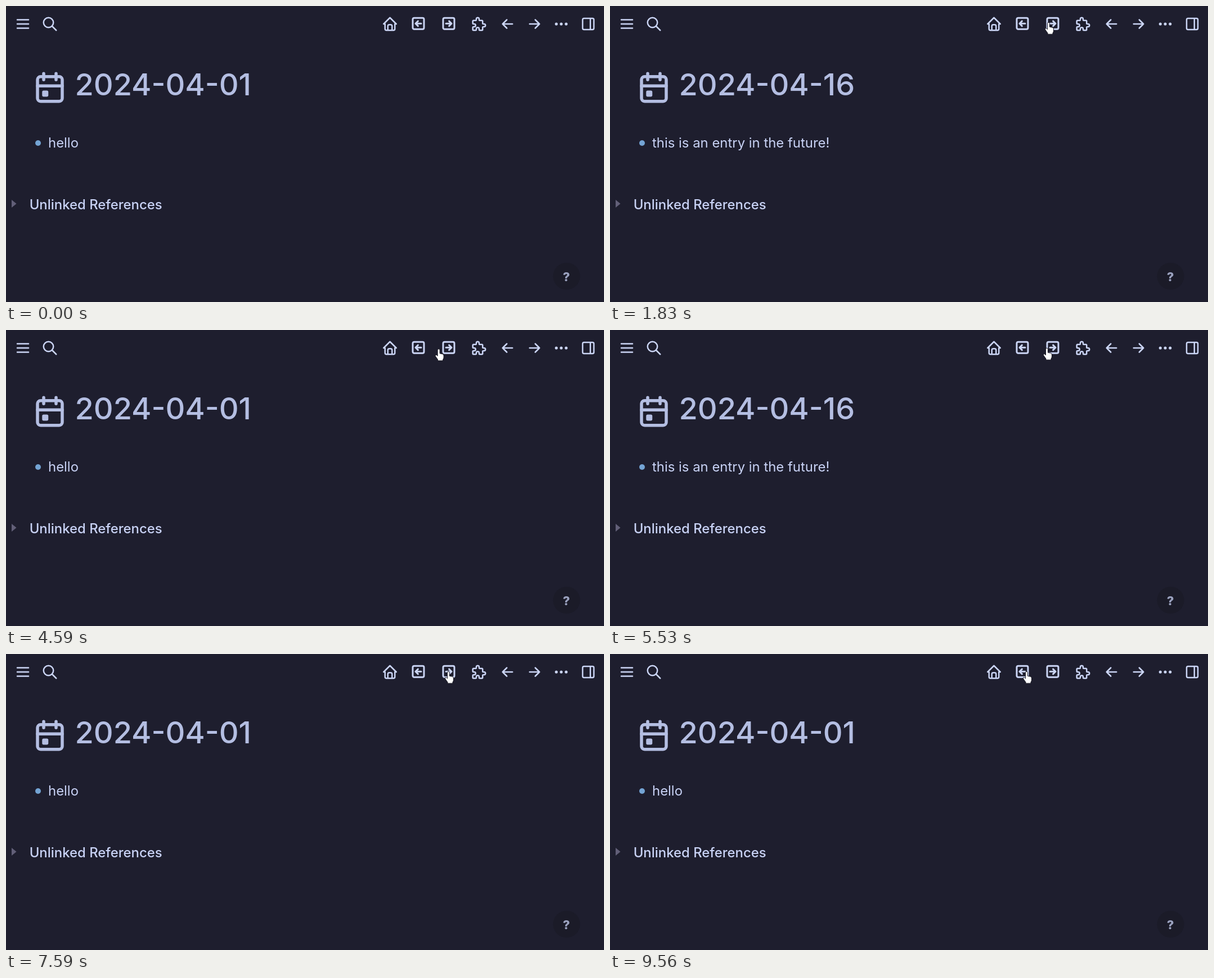
Write an HTML page that moves like this. It is 1063 px wide and 527 px high and loops after 9.96 s.

```html
<!DOCTYPE html>
<html lang="en">
<head>
<meta charset="utf-8">
<title>Journal day navigation</title>
<style>
  html, body { margin: 0; width: 100%; height: 100%; overflow: hidden; background: #1e1e2e; }
  svg { display: block; width: 100%; height: 100%; font-family: Inter, sans-serif; }
  text { fill: #c9d3f6; font-size: 23.9px; }
  .icon { fill: none; stroke: #cbd5f5; stroke-width: 2; stroke-linecap: round; stroke-linejoin: round; }
  #title { fill: #b4bee2; font-size: 54px; font-weight: 500; }
  #tooltip text { fill: #d8d9dc; font: 14.6px "Open Sans", sans-serif; }
  #cursor path { fill: #fff; stroke: #14141f; stroke-width: 1; }
</style>
</head>
<body>
<svg viewBox="0 0 1063 527">
  <g id="toolbar"></g>

  <g class="icon" transform="translate(45 112) scale(2.75)" style="stroke:#b4bee2">
    <rect x="4" y="5" width="16" height="16" rx="2"/>
    <path d="M16 3v4M8 3v4M4 11h16M8 15h2v2h-2z"/>
  </g>
  <text id="title" x="122.500" y="159"></text>

  <circle cx="57" cy="244" r="5" fill="#74a4d4"/>
  <text id="entry" x="75" y="252"></text>

  <path d="M10 345L18.500 352L10 359z" fill="#625f78"/>
  <text x="41.700" y="362" font-weight="500">Unlinked References</text>

  <circle cx="996.500" cy="481" r="24" fill="#1b1b28"/>
  <text x="996" y="490" text-anchor="middle" style="font-size:22px;font-weight:800;fill:#9ba2bf">?</text>

  <g id="tooltip">
    <rect x="790.500" y="49.500" width="137" height="34" fill="#262929" stroke="#96999b"/>
    <text x="802" y="71">open-d-next-day</text>
  </g>

  <g id="cursor">
    <path id="hand" transform="translate(-.5 -.8)" d="M-2 2Q-2 0 0 0Q2 0 2 2V8L7 9Q9 9.500 9 12V15Q9 17 7.500 19V21H-1.500V19Q-4 15.500 -6 12.500Q-6.500 10 -4 10.500L-2 12.500z"/>
    <path id="arrow" d="M0 0V18L4 14.500L7 21L10 19.700L7.200 13.500H12.500z"/>
    <circle id="press" cx="-1.500" cy="-1.500" r="14.500" fill="#ff0" fill-opacity=".47"/>
  </g>
</svg>

<script>
const $ = id => document.getElementById(id);
const LOOP = 9960;

const box = 'M6 4h12a2 2 0 0 1 2 2v12a2 2 0 0 1-2 2h-12a2 2 0 0 1-2-2v-12a2 2 0 0 1 2-2z';
const icons = [
  [30, 32, 'M4 6h16M4 12h16M4 18h16'],
  [78, 32, 'M3 10a7 7 0 1 0 14 0a7 7 0 1 0-14 0M21 21l-6-6'],
  [682.5, 32, 'M5 12h-2l9-9l9 9h-2M5 12v7a2 2 0 0 0 2 2h10a2 2 0 0 0 2-2v-7M9 21v-6a2 2 0 0 1 2-2h2a2 2 0 0 1 2 2v6'],
  [733, 31.2, box + 'M8 12h8M8 12l3.500 3.500M8 12l3.500-3.500', 2.4],
  [787, 31.2, box + 'M8 12h8M16 12l-3.500 3.500M16 12l-3.500-3.500', 2.4],
  [841, 32, 'M4 7h3a1 1 0 0 0 1-1v-1a2 2 0 0 1 4 0v1a1 1 0 0 0 1 1h3a1 1 0 0 1 1 1v3a1 1 0 0 0 1 1h1a2 2 0 0 1 0 4h-1a1 1 0 0 0-1 1v3a1 1 0 0 1-1 1h-3a1 1 0 0 1-1-1v-1a2 2 0 0 0-4 0v1a1 1 0 0 1-1 1h-3a1 1 0 0 1-1-1v-3a1 1 0 0 1 1-1h1a2 2 0 0 0 0-4h-1a1 1 0 0 1-1-1v-3a1 1 0 0 1 1-1z'],
  [891.5, 32, 'M5 12h14M5 12l6 6M5 12l6-6'],
  [939.5, 32, 'M5 12h14M19 12l-6 6M19 12l-6-6'],
  [987, 32, 'M5 12h.01M12 12h.01M19 12h.01', 4.1],
  [1035, 32, box + 'M15 4v16']
];
$('toolbar').innerHTML = icons.map(([x, y, d, width = 2]) =>
  `<path class="icon" transform="translate(${x - 15} ${y - 15}) scale(1.25)" d="${d}" style="stroke-width:${width}"/>`
).join('');

// Pointer hotspot: time, x, y
const path = [
  [70, 985, 510], [320, 890, 270], [560, 774, 25], [690, 780, 30],
  [2590, 780, 30], [3050, 737, 36],
  [4340, 737, 36], [4730, 783, 34],
  [5460, 783, 33], [5530, 777, 33], [6300, 735, 31],
  [7060, 735, 31], [7340, 762, 28], [7590, 787, 32],
  [8330, 787, 32], [8470, 777, 31], [8820, 739, 31], [8960, 741, 32]
];
const presses = [1490, 3380, 4800, 6430, 7860, 9150];
const pageTurns = [1760, 3650, 5060, 6630, 8130, 9360];
const pages = [
  ['2024-04-01', 'hello'],
  ['2024-04-16', 'this is an entry in the future!']
];

function pointerAt(t) {
  const next = path.findIndex(key => key[0] > t);
  if (next < 1) return path.at(next).slice(1);
  const [t0, x0, y0] = path[next - 1], [t1, x1, y1] = path[next];
  const p = (t - t0) / (t1 - t0), ease = p * p * (3 - 2 * p);
  return [x0 + (x1 - x0) * ease, y0 + (y1 - y0) * ease];
}

const show = (id, visible) => $(id).setAttribute('visibility', visible ? 'inherit' : 'hidden');

function draw() {
  const t = performance.now() % LOOP;
  const [x, y] = pointerAt(t);
  const overButton = y < 48 && x < 812;
  const [title, entry] = pages[pageTurns.filter(turn => turn <= t).length % 2];
  $('title').textContent = title;
  $('entry').textContent = entry;
  $('cursor').setAttribute('transform', `translate(${x} ${y})`);
  show('cursor', t >= 70);
  show('hand', overButton);
  show('arrow', !overButton);
  show('press', presses.some(start => t >= start && t < start + 70));
  show('tooltip', t >= 1220 && t < 1490);
  requestAnimationFrame(draw);
}
draw();
</script>
</body>
</html>
```
